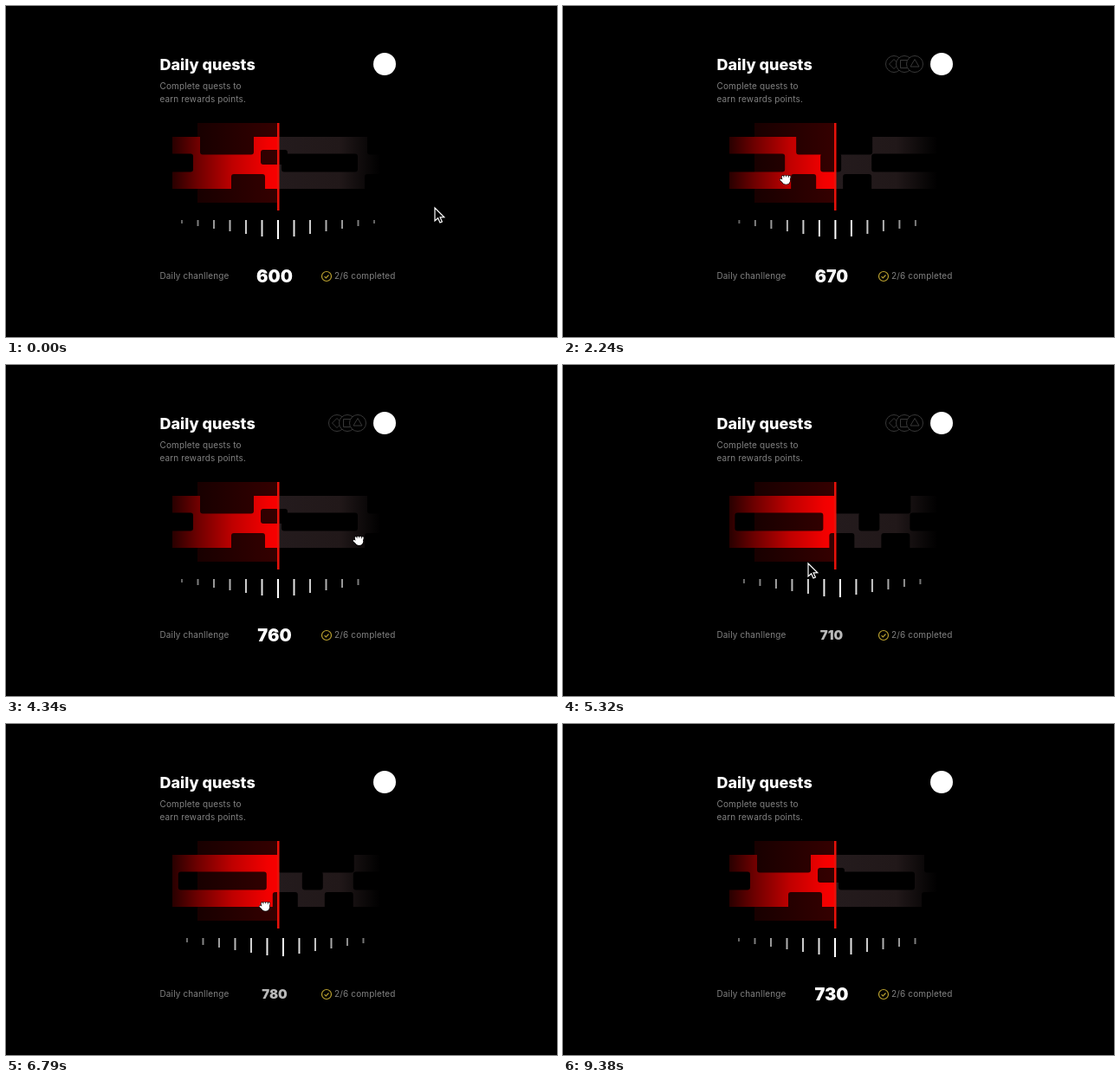
An HTML page with a canvas for the animation above (9.45 s loop, 636 by 382 pixels).

```html
<!DOCTYPE html>
<html lang="en">
<head>
<meta charset="utf-8">
<title>Daily quests</title>
<style>
  html, body { margin: 0; width: 100%; height: 100%; overflow: hidden; background: #000; }
  svg, canvas { position: absolute; left: 0; top: 0; width: 636px; height: 382px; }
  text { font-family: Inter, sans-serif; font-size: 10px; letter-spacing: .13px; fill: #808080; }
  .title { font-size: 18px; font-weight: 800; letter-spacing: 0; fill: #fff; }
  .score { font-size: 20px; font-weight: 900; letter-spacing: 0; text-anchor: middle; }
</style>
</head>
<body>
<svg viewBox="0 0 636 382">
  <text class="title" x="177.5" y="74">Daily quests</text>
  <text x="177.5" y="96">Complete quests to</text>
  <text x="177.5" y="111">earn rewards points.</text>
  <text x="177.5" y="315">Daily chanllenge</text>
  <text x="449.5" y="315" text-anchor="end">2/6 completed</text>
  <text class="score" id="score" x="0" y="7.3">600</text>
  <g fill="none" stroke="#b9a02f" stroke-width="1.2">
    <circle cx="370" cy="312" r="5.5"/>
    <path d="M367.6 312.2l1.7 1.7 3.2-3.4"/>
  </g>
  <circle cx="437" cy="67" r="13" fill="#fff"/>
  <g id="badges" fill="#000" stroke="#383838">
    <circle cx="382" cy="67" r="9.5"/><path d="M382 61.5l5.5 5.5-5.5 5.5-5.5-5.5z"/>
    <circle cx="394" cy="67" r="9.5"/><path d="M389.5 62.5h9v9h-9z"/>
    <circle cx="406" cy="67" r="9.5"/><path d="M406 61.5l5 8.5h-10z"/>
  </g>
</svg>
<canvas id="stage" width="636" height="382"></canvas>
<script>
const LOOP = 9450, STEP = 70, W = 636, H = 382;
const MID = 314, GAP = 18.5, RATIO = 8, TRAVEL = 2 * GAP * RATIO;
const ctx = document.getElementById('stage').getContext('2d');
const score = document.getElementById('score');
const badges = document.getElementById('badges');
const layer = document.createElement('canvas');
layer.width = W;
layer.height = H;
const tc = layer.getContext('2d');

// Swipes alternate: two ticks left, two ticks back
const SWIPES = [[980, 2100], [2170, 3320], [4480, 5605], [6264, 8330]];
// One score per tick passed
const SCORES = [600, 640, 670, 820, 760, 710, 780, 850, 730];
// Pointer path: time, x, y
const PATH = [
  [0, 495, 233], [420, 371, 196], [980, 371, 196], [2100, 257, 199],
  [2240, 257, 199], [3010, 428, 199], [3700, 484, 215], [4480, 400, 200],
  [5320, 283, 229], [5700, 283, 229], [6790, 299, 209], [7630, 489, 209],
  [8330, 645, 212], [LOOP, 645, 212]
];
// Gaps in the track bar, row by row
const ROWS = [
  { top: 140, bottom: 171.5, gaps: [[224, 286], [417, 433], [562, 650]] },
  { top: 170.5, bottom: 191.5, gaps: [[-99, 216], [318, 406], [447, 549], [590, 614], [649, 760]] },
  { top: 194, bottom: 222, gaps: [[260, 299], [414, 440], [556, 585], [616, 649]] },
  { top: 166, bottom: 183, gaps: [[294, 325]] }
];

const ramp = (t, a, b) => Math.max(0, Math.min(1, (t - a) / (b - a)));
const ease = s => s * s * (3 - 2 * s);

const swipesAt = t => SWIPES.map(([a, b]) => ease(ramp(t, a, b)));

function pointerAt(t) {
  const i = PATH.findIndex(([end]) => end > t);
  const [t0, x0, y0] = PATH[i - 1], [t1, x1, y1] = PATH[i];
  const s = ease(ramp(t, t0, t1));
  return { x: x0 + (x1 - x0) * s, y: y0 + (y1 - y0) * s };
}

function gradient(c, x0, x1, stops) {
  const g = c.createLinearGradient(x0, 0, x1, 0);
  stops.forEach(([x, color]) => g.addColorStop((x - x0) / (x1 - x0), color));
  return g;
}

const trackFill = gradient(tc, 192, 432, [
  [192, '#280000'], [222, '#700000'], [262, '#c00000'], [302, '#f20000'], [MID, '#f80000'],
  [MID, '#241b1d'], [385, '#211819'], [432, '#000']
]);
const glow = gradient(ctx, 221, MID, [[221, '#180000'], [MID, '#350000']]);

function drawTrack(p) {
  tc.globalCompositeOperation = 'source-over';
  tc.clearRect(0, 0, W, H);
  tc.fillStyle = trackFill;
  tc.fillRect(192, 151, 240, 60);
  tc.globalCompositeOperation = 'destination-out';
  tc.beginPath();
  for (const { top, bottom, gaps } of ROWS)
    for (const [l, r] of gaps) tc.roundRect(l + p, top, r - l, bottom - top, 3);
  tc.fill();

  ctx.fillStyle = glow;
  ctx.fillRect(221, 135, MID - 221, 92);
  ctx.drawImage(layer, 0, 0);
  ctx.fillStyle = '#e8120a';
  ctx.fillRect(313, 135, 2.5, 101);
}

function drawTicks(shift, started) {
  const right = started ? 422 : 428;
  for (let i = -8; i <= 8; i++) {
    const x = MID + shift % GAP + i * GAP;
    if (x < 200 || x > right) continue;
    const far = Math.abs(x - MID) / GAP;
    const v = Math.round(255 - 26 * far);
    ctx.fillStyle = `rgb(${v},${v},${v})`;
    ctx.fillRect(x - 1, 247, 2, 22 - 3 * far);
  }
}

// Full size on a tick, small and gray between ticks
function drawScore(total, shift) {
  const off = Math.abs(shift - Math.round(shift / GAP) * GAP);
  const away = Math.min(1, off / 4.5), v = Math.round(255 - 70 * away);
  score.textContent = SCORES[Math.floor(total * 2)];
  score.setAttribute('transform', `translate(310 312) scale(${1 - .25 * away})`);
  score.style.fill = `rgb(${v},${v},${v})`;
}

const ARROW = new Path2D('M0 0V15L3.6 11.8 6 17 8.4 16 6.1 10.9 10.8 10.7Z');

function drawArrow() {
  ctx.fillStyle = '#000';
  ctx.fill(ARROW);
  ctx.strokeStyle = '#fff';
  ctx.lineWidth = 1.2;
  ctx.stroke(ARROW);
}

function drawHand(shut) {
  const reach = shut ? .35 : 1;
  ctx.lineCap = 'round';
  for (const [color, grow] of [['#000', 1.2], ['#fff', 0]]) {
    ctx.strokeStyle = ctx.fillStyle = color;
    ctx.lineWidth = 2 + grow;
    ctx.beginPath();
    for (let i = 0; i < 4; i++) {
      const x = -3 + 2.4 * i, lean = i - 1.5;
      ctx.moveTo(x, 0);
      ctx.lineTo(x + lean * .8 * reach, (Math.abs(lean) - 7.5) * reach);
    }
    ctx.moveTo(-2, 4.5);
    ctx.lineTo(-5.5, 1.5);
    ctx.stroke();
    ctx.beginPath();
    ctx.ellipse(.5, 2.5, 4.6 + grow / 2, 4.2 + grow / 2, 0, 0, 7);
    ctx.fill();
  }
}

function drawPointer(t) {
  const { x, y } = pointerAt(t);
  const over = x > 192 && x < 432 && y < 212;
  const shut = SWIPES.some(([a, b]) => t >= a - 210 && t < a + (b - a) * .72);
  ctx.save();
  ctx.translate(x, y);
  if (over) drawHand(shut);
  else drawArrow();
  ctx.restore();
}

function frame(now) {
  const t = Math.floor((now % LOOP) / STEP) * STEP;
  const swipes = swipesAt(t);
  const total = swipes.reduce((sum, s) => sum + s, 0);
  const pulled = swipes.reduce((sum, s, i) => sum + (i % 2 ? -s : s), 0);
  const p = -TRAVEL * pulled, shift = p / RATIO;
  ctx.clearRect(0, 0, W, H);
  drawTrack(p);
  drawTicks(shift, total > 0);
  drawScore(total, shift);
  badges.style.opacity = ramp(t, 980, 1400) - ramp(t, 5740, 6160);
  drawPointer(t);
}

const start = performance.now();
function loop() {
  frame(performance.now() - start);
  requestAnimationFrame(loop);
}
loop();
</script>
</body>
</html>
```
